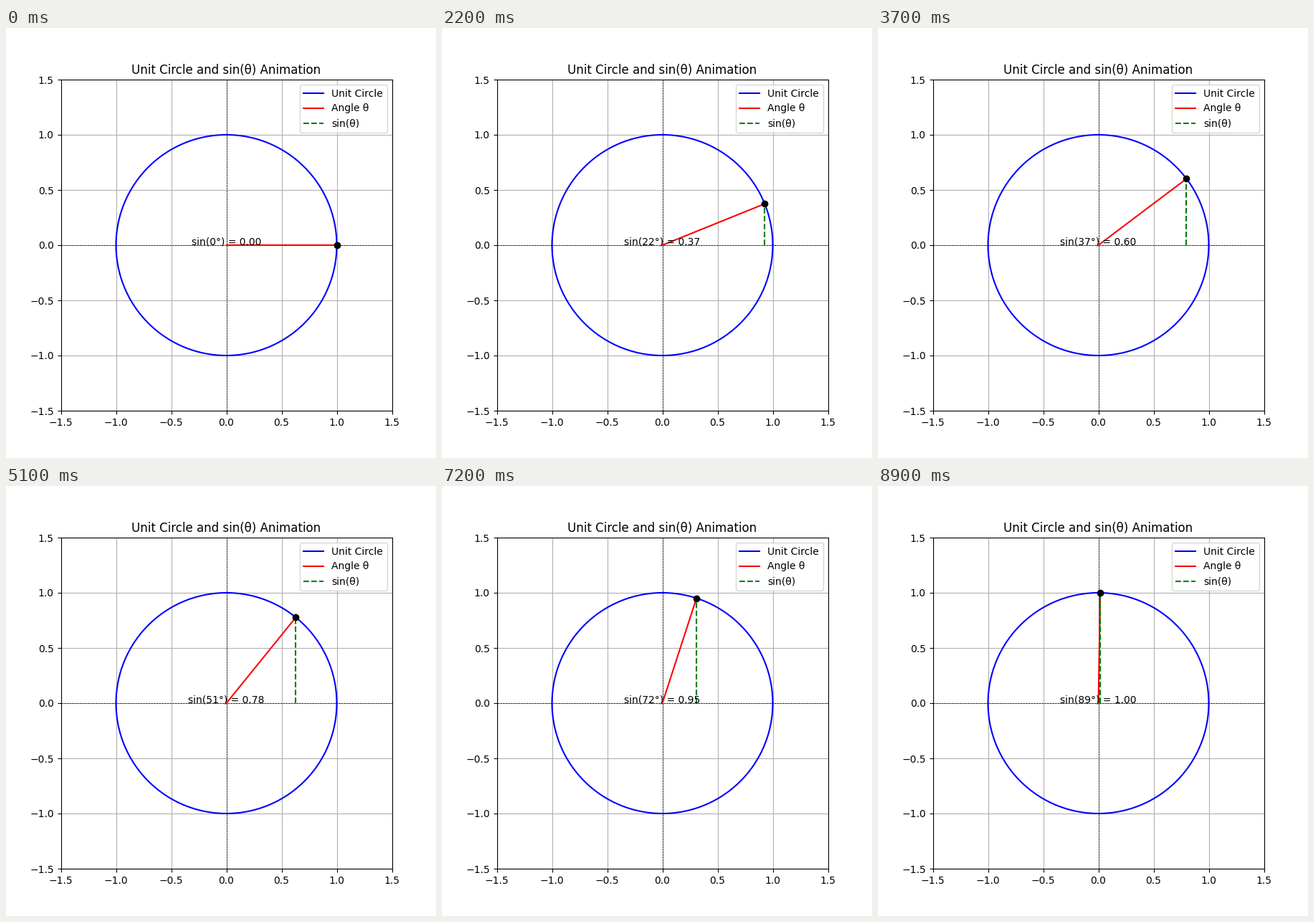
These frames come from a looping animation (600x600 px, 9 s). A matplotlib script:

```python
import numpy as np
import matplotlib.pyplot as plt
from matplotlib.animation import FuncAnimation

FRAMES = 90  # one degree per frame
INTERVAL = 100

fig, ax = plt.subplots(figsize=(6, 6), dpi=100)
ax.set_xlim(-1.5, 1.5)
ax.set_ylim(-1.5, 1.5)
ax.set_aspect("equal")
ax.grid(True)
ax.set_title("Unit Circle and sin(θ) Animation")
ax.axhline(0, color="black", linewidth=0.5, linestyle="--")
ax.axvline(0, color="black", linewidth=0.5, linestyle="--")

t = np.linspace(0, 2 * np.pi, 361)
ax.plot(np.cos(t), np.sin(t), "b-", label="Unit Circle")
radius, = ax.plot([], [], "r-", label="Angle θ")
height, = ax.plot([], [], "g--", label="sin(θ)")
point, = ax.plot([], [], "ko")
label = ax.text(0, 0, "", ha="center")
ax.legend(loc="upper right")


def update(deg):
    theta = np.radians(deg)
    x, y = np.cos(theta), np.sin(theta)
    radius.set_data([0, x], [0, y])
    height.set_data([x, x], [0, y])
    point.set_data([x], [y])
    label.set_text(f"sin({deg}°) = {y:.2f}")
    return radius, height, point, label


anim = FuncAnimation(fig, update, frames=FRAMES, interval=INTERVAL,
                     repeat=True, repeat_delay=0)
plt.show()
```
